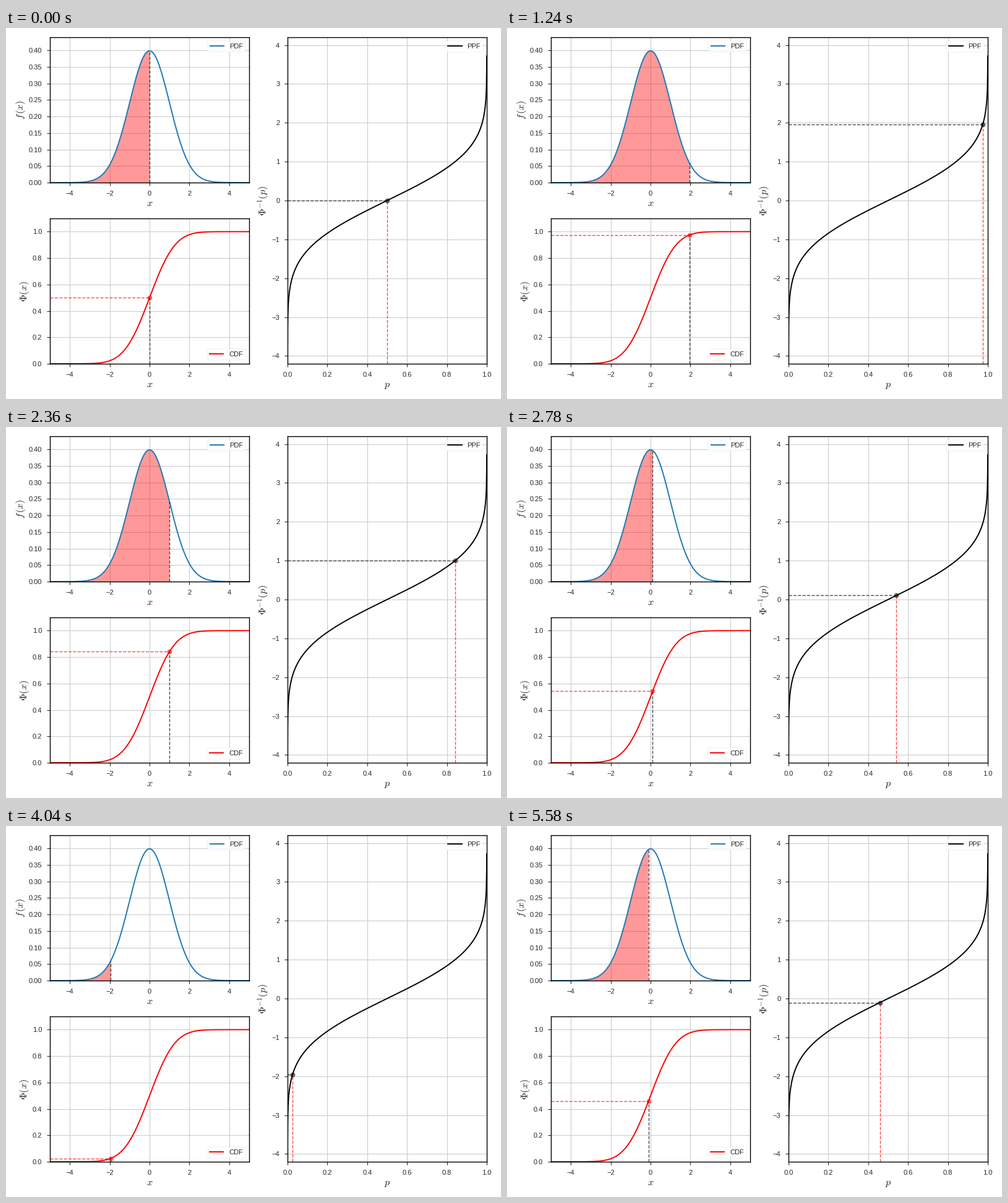
A matplotlib script for the animation above (5.6 s loop, 800 by 600 pixels).

```python
import math

import matplotlib.pyplot as plt
import numpy as np
from matplotlib.animation import FuncAnimation

W, H, DPI = 800, 600, 100
INK = "0.15"
STEPS = 120
TICK_MS = 20
LOOP_MS = 5600

plt.rcParams.update({
    "font.family": "Liberation Sans",
    "mathtext.fontset": "cm",
    "text.color": INK,
    "axes.axisbelow": True,
    "axes.linewidth": 1.0,
    "axes.edgecolor": "black",
    "grid.color": "0.8",
    "grid.linewidth": 0.8,
    "lines.linewidth": 1.4,
    "patch.linewidth": 0.24,
    "legend.fontsize": 8,
    "xtick.labelsize": 8,
    "ytick.labelsize": 8,
    "xtick.major.pad": 5.6,
    "ytick.major.pad": 5.6,
    "xtick.major.width": 0.8,
    "ytick.major.width": 0.8,
    "xtick.color": INK,
    "ytick.color": INK,
})


def pdf(x):
    return np.exp(-x * x / 2) / math.sqrt(2 * math.pi)


def cdf(x):
    return 0.5 * (1 + math.erf(x / math.sqrt(2)))


fig = plt.figure(figsize=(W / DPI, H / DPI), dpi=DPI, facecolor="white")


def panel(left, top, right, bottom, xlim, ylim, xticks, yticks, yfmt):
    ax = fig.add_axes([left / W, 1 - bottom / H,
                       (right - left) / W, (bottom - top) / H])
    ax.set(xlim=xlim, ylim=ylim, xticks=xticks, yticks=yticks)
    ax.yaxis.set_major_formatter(yfmt)
    ax.grid(True)
    return ax


def label(x, y, text, rotation=0):
    fig.text(x / W, 1 - y / H, text, size=11.7, ha="center", va="baseline",
             rotation=rotation, rotation_mode="anchor")


def bake(axes):
    """Paint grid, ticks and labels once and keep them as a backdrop."""
    for ax in axes:
        ax.spines[:].set_visible(False)
    fig.canvas.draw()
    backdrop = np.array(fig.canvas.buffer_rgba())
    for ax in axes:
        ax.spines[:].set_visible(True)
        ax.xaxis.set_visible(False)
        ax.yaxis.set_visible(False)
        ax.patch.set_visible(False)
    for text in fig.texts:
        text.set_visible(False)
    fig.figimage(backdrop, zorder=-1)


def guide(ax, color):
    return ax.plot([], [], "--", color=color, lw=1, alpha=0.7)[0]


def dot(ax, color):
    return ax.plot([], [], "o", color=color, ms=5.6, mew=0, alpha=0.6)[0]


X_TICKS = [-4, -2, 0, 2, 4]
UNIT = np.arange(6) / 5
ax_pdf = panel(71, 15, 393, 250, (-5, 5), (0, 0.44),
               X_TICKS, np.arange(9) * 0.05, "{x:.2f}")
ax_cdf = panel(71, 308, 393, 543, (-5, 5), (0, 1.1),
               X_TICKS, UNIT, "{x:.1f}")
ax_ppf = panel(455, 15, 777, 543, (0, 1), (-4.2, 4.2),
               UNIT, np.arange(-4, 5),
               lambda v, _: f"{v:.0f}".replace("-", "\u2212"))
axes = [ax_pdf, ax_cdf, ax_ppf]

label(232, 288, "$x$")
label(232, 581, "$x$")
label(616, 581, "$p$")
label(27.5, 132.5, r"$f\hspace{0.1}(x)$", 90)
label(33.5, 425.5, r"$\Phi(x)$", 90)
label(421, 279, r"$\Phi^{-1}(p)$", 90)
bake(axes)

xs = np.linspace(-5, 5, 500)
zs = np.linspace(-3.719, 3.719, 500)
ax_pdf.plot(xs, pdf(xs), color="#1f77b4", label="PDF")
ax_cdf.plot(xs, [cdf(x) for x in xs], color="red", label="CDF")
ax_ppf.plot([cdf(z) for z in zs], zs, color="black", label="PPF")
for ax, loc in zip(axes, ["upper right", "lower right", "upper right"]):
    ax.legend(loc=loc)

area = ax_pdf.fill([0, 0], [0, 0], color="red", alpha=0.4, lw=0, zorder=1)[0]
pdf_drop = guide(ax_pdf, "black")
cdf_drop, cdf_side = guide(ax_cdf, "black"), guide(ax_cdf, "red")
ppf_side, ppf_drop = guide(ax_ppf, "black"), guide(ax_ppf, "red")
cdf_dot, ppf_dot = dot(ax_cdf, "red"), dot(ax_ppf, "black")


def update(tick):
    # three poses per 140 ms, held for 20, 100 and 20 ms
    group, rest = divmod(tick, 7)
    step = 3 * group + (rest > 0) + (rest > 5)
    x = 2 * math.sin(2 * math.pi * step / STEPS)
    p = cdf(x)

    left = np.linspace(-5, x, 250)
    area.set_xy(np.column_stack([np.r_[left, x, -5],
                                 np.r_[pdf(left), 0, 0]]))
    pdf_drop.set_data([x, x], [0, pdf(x)])
    cdf_drop.set_data([x, x], [0, p])
    cdf_side.set_data([-5, x], [p, p])
    cdf_dot.set_data([x], [p])
    ppf_side.set_data([0, p], [x, x])
    ppf_drop.set_data([p, p], [-4.2, x])
    ppf_dot.set_data([p], [x])
    return (area, pdf_drop, cdf_drop, cdf_side, cdf_dot,
            ppf_side, ppf_drop, ppf_dot)


anim = FuncAnimation(fig, update, frames=LOOP_MS // TICK_MS,
                     interval=TICK_MS, repeat=True, repeat_delay=0)
plt.show()
```
